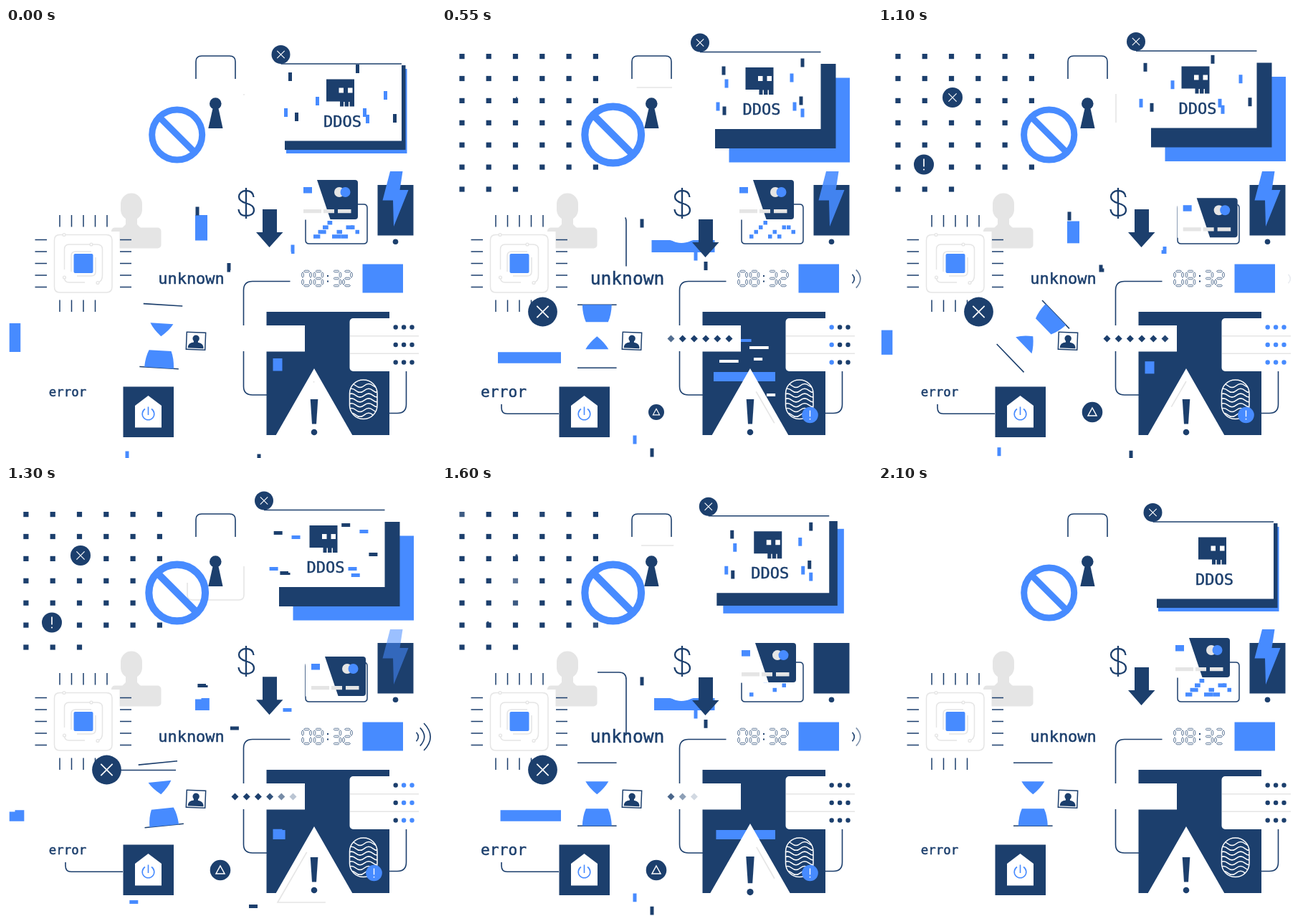
Animation, 600 px wide and 600 px high, one loop 2.15 s. Source, as an HTML page with a canvas:

```html
<!DOCTYPE html>
<html lang="en">
<head>
<meta charset="utf-8">
<title>Cyber security</title>
<style>
html, body { margin: 0; height: 100%; overflow: hidden; background: #fff; }
canvas { display: block; width: 100vw; height: 100vh; }
</style>
</head>
<body>
<canvas id="stage"></canvas>
<script>
const LOOP = 2150, CYCLE = 1040, STEP = 50;
const NAVY = '#1c3f6d', BLUE = '#478bff', GREY = '#e5e5e5', WHITE = '#fff';
const canvas = document.getElementById('stage');
const g = canvas.getContext('2d');
const dpr = window.devicePixelRatio || 1;
canvas.width = canvas.height = 600 * dpr;

// ---- timing ----
const clamp = v => Math.max(0, Math.min(1, v));
const seg = (t, a, b) => clamp((t - a) / (b - a));
const mix = (a, b, p) => a + (b - a) * p;
const sine = p => (1 - Math.cos(Math.PI * p)) / 2;
const quad = p => p < .5 ? 2 * p * p : 1 - 2 * (1 - p) ** 2;
const cubic = p => p < .5 ? 4 * p ** 3 : 1 - 4 * (1 - p) ** 3;
const inOut = (t, a, b, c, d) => sine(seg(t, a, b)) - sine(seg(t, c, d));
const random = n => {
  const v = Math.sin(n * 12.9898 + 4.1) * 43758.5453;
  return v - Math.floor(v);
};
function keys(t, ...list) {
  let [t0, v0] = list[0];
  for (const [t1, v1] of list) {
    if (t < t1) return t <= t0 ? v0 : mix(v0, v1, (t - t0) / (t1 - t0));
    t0 = t1; v0 = v1;
  }
  return v0;
}

// ---- drawing ----
function rect(x, y, w, h, color) {
  g.fillStyle = color;
  g.fillRect(x, y, w, h);
}
function disc(x, y, r, color) {
  g.fillStyle = color;
  g.beginPath();
  g.arc(x, y, Math.max(0, r), 0, 7);
  g.fill();
}
function fill(d, color) {
  g.fillStyle = color;
  g.fill(new Path2D(d));
}
function round(x, y, w, h, r, color) {
  g.fillStyle = color;
  g.beginPath();
  g.roundRect(x, y, w, h, r);
  g.fill();
}
function stroke(d, color = NAVY, width = 1.6) {
  g.strokeStyle = color;
  g.lineWidth = width;
  g.stroke(new Path2D(d));
}
// the stretch of a path from tail to head, both in pixels
function trim(d, tail, head, color, width) {
  if (head <= tail) return;
  g.save();
  g.setLineDash([head - tail, 9999]);
  g.lineDashOffset = -tail;
  stroke(d, color, width);
  g.restore();
}
function at(x, y, scale, draw, angle = 0) {
  if (scale <= .01) return;
  g.save();
  g.translate(x, y);
  g.rotate(angle);
  g.scale(scale, scale);
  draw();
  g.restore();
}
function fade(alpha, draw) {
  if (alpha <= 0) return;
  g.save();
  g.globalAlpha = Math.min(1, alpha);
  draw();
  g.restore();
}
function label(text, x, y, size) {
  g.fillStyle = g.strokeStyle = NAVY;
  g.lineWidth = .5;
  g.font = size + 'px "DejaVu Sans Mono", monospace';
  g.textAlign = 'center';
  g.fillText(text, x, y);
  g.strokeText(text, x, y);
}
function crossBadge(x, y, r) {
  at(x, y, r / 20, () => {
    disc(0, 0, 20, NAVY);
    stroke('M-8-8L8 8M8-8L-8 8', WHITE, 1.7);
  });
}
function alertBadge(x, y, r, color) {
  at(x, y, r / 14, () => {
    disc(0, 0, 14, color);
    stroke('M0-8V3', WHITE, 1.7);
    disc(0, 7, 1.1, WHITE);
  });
}

// ---- glitches ----
// a short bit that drops to (x, y), runs sideways and turns back
function dart(ph, color, x, y, run, drop = 20 * Math.sign(run)) {
  const fall = Math.abs(drop), turn = fall + Math.abs(run), end = turn + 12;
  const tail = keys(ph, [0, 0], [250, fall], [550, turn], [850, end - 5], [930, end]);
  trim(`M${x} ${y - drop}V${y}h${run}v${-12 * Math.sign(run)}`, tail, Math.min(end, tail + 12), color, 5);
}
// a wide bar that falls, squeezes round the corner and stretches out
function slab(ph, x, y, drop, run, width) {
  const end = drop + run;
  const tail = keys(ph, [0, 0], [250, drop - 8], [550, drop + Math.max(0, run - 88)], [800, end]);
  const head = keys(ph, [0, drop - 8], [250, drop + 8], [550, end]);
  trim(`M${x} ${y - drop}V${y}h${run}`, tail, head, BLUE, width);
}
function looseGlitches(ph) {
  slab(ph, 12.5, 460, 48, 153.5, 15.5);
  slab(ph, 272.5, 304.5, 43.5, 108, 17);
  fill('M312 295C324 296 324 300 334 300S346 296 356 295Z', WHITE);
  dart(ph, NAVY, 267, 278.5, 12, 29);
  dart(ph, BLUE, 400, 312.5, -46, 10);
  dart(ph, NAVY, 311, 338, 57, 10);
  dart(ph, NAVY, 353, 586.5, -60);
  dart(ph, BLUE, 169, 580.5, 100, -22);
}

// ---- scene parts ----
function dotGrid(t) {
  for (let j = 0; j < 7; j++) for (let i = 0; i < (j < 6 ? 6 : 3); i++) {
    const x = 27.9 + i * 37.3, y = 39.6 + j * 30.9, n = i + j * 6;
    if (Math.hypot(x - 239, y - 149) < 40) continue;
    const come = seg(t, 10 + j * 14 + random(n) * 120, 220 + j * 14 + random(n) * 120);
    const late = 1540 + random(n + 50) * 350;
    fade(come - seg(t, late, late + 200), () => rect(x - 3.6, y - 3.6, 7.2, 7.2, NAVY));
  }
  crossBadge(104, 97, 14 * inOut(t, 510, 750, 1430, 1650));
  alertBadge(64, 190.5, 14 * inOut(t, 570, 920, 1430, 1650), NAVY);
}

function lock(ph, a, b) {
  stroke('M265 71V47Q265 39 273 39H312Q320 39 320 47V71');
  trim('M332 92V152Q332 159 325 159H260Q253 159 253 152V90Q253 83 260 83H325Q332 83 332 90V92', 298 * a, 298 * b, GREY);
  disc(292.3, 105.5, 8.3, NAVY);
  fill('M289 110H296L302.5 140H282.3Z', NAVY);
  at(238.7, 149, 1 + .125 * inOut(ph, 40, 240, 620, 800), () => {
    stroke('M35 0A35 35 0 1 1 -35 0A35 35 0 1 1 35 0M-25 -25L25 25', BLUE, 9);
  });
}

function panel(t, ph) {
  const u = inOut(t, 0, 500, 1350, 1850);
  const gap = inOut(t, 165, 550, 1380, 1770);
  const bob = -2 * Math.sin(Math.PI * seg(t, 550, 1300));
  const x = 383.5 - 23.5 * u, y = 50 - 16.5 * u + bob;
  const nx = 389 - 8 * Math.sin(u * Math.PI / 2);
  const ny = 52 - 2 * u - 2 * Math.sin(u * Math.PI) + bob;
  rect(nx + 2 + 17.5 * gap, ny + 5 + 14.5 * gap, 168.5, 118, BLUE);
  rect(nx, ny, 168.5, 118, NAVY);
  rect(x, y, 168.5, 107.5, WHITE);
  at(x, y, 1, () => {
    stroke('M0 0H168.5');
    crossBadge(0, -13, 13);
    fill('M63.5 21.5h39v38h-20v-7h-19z', NAVY);
    fill('M81 33.5h6.5v7h-6.5zM93.5 33.5h6.5v7h-6.5zM87.5 53h1.5v7h-1.5zM94.5 53h1.5v7h-1.5z', WHITE);
    label('DDOS', 86, 87.5, 22);
    dart(ph, NAVY, 13, 32, 20);
    dart(ph, NAVY, 22, 88, 12);
    dart(ph, NAVY, 107, 21, 36);
    dart(ph, NAVY, 159, 62, -18);
    dart(ph, BLUE, 7, 82, 18);
    dart(ph, BLUE, 51, 38, -14);
    dart(ph, BLUE, 146, 30, -18);
    dart(ph, BLUE, 117, 82, 15);
    dart(ph, BLUE, 121, 91, 22);
  });
}

function card(t) {
  const s = inOut(t, 700, 1150, 1340, 1740);
  const wide = 1 - inOut(t, 250, 550, 1650, 2000);
  stroke('M423 246H499Q504 246 504 251V296Q504 301 499 301H423Q418 301 418 296V251Q418 246 423 246Z', NAVY, 1.5);
  for (let i = 0; i < 10; i++) {
    if (random(i + 9) < s * 1.4) continue;
    const y = 269 + Math.floor(random(i + 3) * 4) * 6.4;
    rect(429 + i * 6.5, y, 5.5 + 9 * wide * random(i + 30) * (i < 8), 5.5, BLUE);
  }
  at(11 * s, 26 * s, 1, () => {
    rect(407, 211, 84, 56.5, WHITE);
    fill('M434 212H487Q491 212 491 216V263Q491 267 487 267H452.5Z', NAVY);
    rect(415, 222, 12, 8.5, BLUE);
    fill('M415 253h25v5.3h-25zM443 253h15v5.3h-15zM463 253h18.5v5.3h-18.5z', GREY);
    disc(465, 229, 7, GREY);
    disc(473.5, 229, 7, BLUE);
  });
}

function phone(t) {
  rect(518.5, 219, 50, 70.5, NAVY);
  disc(543.5, 298.3, 3.8, NAVY);
  const glow = 1 - inOut(t, 30, 200, 400, 590) - inOut(t, 1210, 1400, 1850, 2050);
  fade(glow, () => fill('M536 200H553.5L549.5 226H561.5L541 277L540 240.5H525.5Z', BLUE));
}

function money(ph) {
  stroke('M335 223V266M345.5 236C345 230 341 227 335 227C329 227 325 231 325 235.5C325 241 330 243 335 244.5C341 246 346 248.5 346 254C346 259.5 341 262 335 262C329 262 325 259 324.5 253', NAVY, 2.3);
  at(0, 14 * inOut(ph, 50, 300, 600, 800), 1, () => fill('M358 253H378V285H386.5L367.5 306L349 285H358Z', NAVY));
}

// lit segments: top, upper right, lower right, bottom, lower left, upper left, middle
const SEGMENTS = { 0: '1111110', 8: '1111111', 3: '1111001', 2: '1101101' };

function digit(x, n) {
  const spots = [[0, 0, 1], [11, 0, 0], [11, 10, 0], [0, 20, 1], [0, 10, 0], [0, 0, 0], [0, 10, 1]];
  spots.forEach(([dx, dy, flat], i) => {
    if (SEGMENTS[n][i] === '0') return;
    at(x + dx + 1, 339.5 + dy, 1, () => stroke(
      flat ? 'M1.5 0L3 -1.3H8L9.5 0L8 1.3H3Z' : 'M0 1.3L-1.3 3V7L0 8.7L1.3 7V3Z', NAVY, .7));
  });
}

function clock(ph) {
  digit(413, 0);
  digit(429.5, 8);
  rect(448, 345, 2, 2, NAVY);
  rect(448, 352.5, 2, 2, NAVY);
  digit(454.5, 3);
  digit(470, 2);
  rect(497.5, 329.5, 56.5, 40, BLUE);
  for (let i = 0; i < 3; i++) {
    const x = 575 + 8 * i, h = 6.2 + 6.4 * i, b = 2.5 + 2.7 * i;
    const on = seg(ph, 50 + 45 * i, 150 + 45 * i) - seg(ph, 600 - 75 * i, 680 - 75 * i);
    fade(on, () => stroke(`M${x - b} ${350 - h}Q${x + b * 1.3} 350 ${x - b} ${350 + h}`));
  }
}

function warning(t, a, b) {
  const s = 1 + .135 * (inOut(t, 60, 230, 270, 450) + inOut(t, 1350, 1500, 1530, 1680));
  const apex = 530 - 55 * s, half = (568 - apex) * .573;
  fill(`M430 ${apex}L${430 + half} 568H${430 - half}Z`, WHITE);
  const e = (s - 1) * 60, w = 51 + e;
  trim(`M430 ${493 - e}L${430 - w} ${581 + e}H${430 + w}Z`, 6 * w * a, 6 * w * b, GREY);
  at(430, 530, s, () => {
    fill('M-5.3 -12H5.3L3 22.5H-3Z', NAVY);
    disc(0, 34, 4.3, NAVY);
  });
}

function fingerprint(t) {
  g.save();
  const print = new Path2D();
  print.roundRect(479.5, 491, 38.5, 54.5, 19);
  g.strokeStyle = WHITE;
  g.lineWidth = 1.5;
  g.stroke(print);
  g.clip(print);
  for (let y = 499; y < 545; y += 6.8) stroke(`M476 ${y}q6 -5 12 0t12 0t12 0t12 0`, WHITE, 1.5);
  g.restore();
  alertBadge(513.5, 540, 11.3 * inOut(t, 50, 230, 1700, 1900), BLUE);
}

function device(t, ph, a, b) {
  stroke('M396.5 353.5H344Q331.5 353.5 331.5 366V415M331.5 451V500Q331.5 512 344 512H364');
  stroke('M558.5 478V525Q558.5 537.5 546 537.5H534');
  rect(363.5, 396, 171.5, 172, NAVY);
  rect(340, 415, 77, 36.5, WHITE);
  round(479.5, 405, 97, 74, 5, WHITE);
  stroke('M480 429.7H576M480 454.2H576', GREY, 1.5);
  for (let i = 0; i < 3; i++) for (let j = 0; j < 3; j++) {
    const lit = t >= 550 + i * 100 && t < 1300 + i * 100;
    disc(543.7 + i * 11.4, 417.5 + j * 24.5, 3.2, lit ? BLUE : NAVY);
  }
  for (let j = 0; j < 6; j++) {
    const alpha = seg(t, 88 + 69 * j, 242 + 69 * j) - seg(t, 1090 + 90 * j, 1390 + 90 * j);
    fade(alpha, () => fill(`M${400.5 - j * 16.2} 428.5l5 5l-5 5l-5 -5z`, NAVY));
  }
  slab(ph, 379, 486.5, 25.5, 86, 13);
  const scan = Math.sin(Math.PI * seg(t, 400, 900));
  [[387, 463], [429, 444], [435, 460], [453, 510]].forEach(([x, y], i) =>
    rect(x, y, (i < 2 ? 33 : 15) * scan, 4, WHITE));
  rect(417, 434, 18 * scan, 4, BLUE);
  warning(t, a, b);
  fingerprint(t);
}

function chip(t) {
  round(160, 230.5, 30, 38, 15, GREY);
  round(147, 278.5, 69.5, 29, 5, GREY);
  fill('M167 260H183V274L188 279H162L167 274Z', GREY);
  rect(62, 284, 96.5, 92, WHITE);
  for (let i = 0; i < 5; i++) {
    const p = i * 16.5;
    stroke(`M${75 + p} 261V277.5M40.5 ${295.5 + p}H57M159 ${295.5 + p}H175`, NAVY, 1.5);
    if (i < 4) stroke(`M${75 + p} 379.5V396`, NAVY, 1.5);
  }
  stroke('M79 288.5H75Q67.5 288.5 67.5 296V361Q67.5 369 75 369H140Q148 369 148 361V296Q148 288.5 140 288.5H83', GREY, 1.5);
  stroke('M81.5 337V309Q81.5 302 88 302H117M121 302H127Q134.5 302 134.5 309V345Q134.5 353 129 355M81.5 349Q82 355 88 355H110M91 340V318Q91 312 97 312H119M125 320V340Q125 346 119 346H99', GREY, 1.5);
  for (const [x, y] of [[81, 288.5], [119, 302], [81.5, 348], [128, 355.5]]) {
    disc(x, y, 2.6, GREY);
    disc(x, y, 1.2, WHITE);
  }
  round(94.5, 315, 27, 27, 2, BLUE);

  const y = t < 700 ? 401 : 396.5;
  const reach = inOut(t, 130, 290, 370, 480) + inOut(t, 1130, 1280, 1370, 1480);
  if (reach > 0) stroke(`M158 ${y}H${158 + 79 * reach}`);
  if (t > 750 && t < 950) stroke('M241 400.5Q246 400.5 250 397.5');
  crossBadge(140.5, 396, 20.4 * inOut(t, 50, 285, 1700, 1900));
}

function hourglass(t) {
  const turn = cubic(seg(t, -85, 415)) + cubic(seg(t, 900, 1400));
  at(216.3, 430.2, 1, () => {
    stroke('M-27.3 -44H27.3M-27.3 44H27.3');
    fill('M-16 -18H16Q11 -9 0 0Q-11 -9 -16 -18ZM-15.5 20H15.5Q20 30 20.5 44H-20.5Q-20 30 -15.5 20Z', BLUE);
  }, turn * Math.PI);
}

function icons(t) {
  at(265, 436.7, 1, () => {
    stroke('M-13.2 -12H13.2V12H-13.2Z', NAVY, 1.5);
    disc(0, -3.5, 4.7, NAVY);
    fill('M-11 10Q-11 3 -3 2V-1H3V2Q11 3 11 10Z', NAVY);
  }, .04);

  const come = sine(seg(t, 50, 490)), gone = sine(seg(t, 1650, 1850));
  trim('M163 538.3H91Q83 538.3 83 530V525', 91 * gone, 91 * come, NAVY);
  rect(163.5, 500.5, 70.5, 70.5, NAVY);
  fill('M180 527L198.5 513L217 527V557.5H180Z', WHITE);
  stroke('M194 531.5A8.3 8.3 0 1 0 203 531.5M198.5 528.5V540', BLUE);

  at(299, 536, inOut(t, 380, 630, 1700, 1900), () => {
    disc(0, 0, 14.3, NAVY);
    stroke('M0 -6L6 5H-6Z', WHITE, 1.5);
  });
}

function words(t, ph) {
  const err = inOut(t, 150, 240, 600, 720) + inOut(t, 1400, 1500, 1660, 1760);
  const big = inOut(ph, 400, 500, 620, 720);
  label('error', 86, 514 + err, 17.4 + 3.8 * err);
  label('unknown', 258.5, 357 + big, 22 + 2.6 * big);
  const wire = 'M217 260H247Q257 260 257 270V348';
  trim(wire, 125 * seg(t, 450, 760), 125 * .87 * seg(t, 350, 550), NAVY);
  trim(wire, 125 * seg(t, 1650, 1800), 125 * seg(t, 1400, 1600), NAVY);
}

function draw(t) {
  // the two glitch cycles end just before the loop does
  const ph = t < 2 * CYCLE ? t % CYCLE : CYCLE;
  const a = quad(seg(ph, 150, 750));
  const b = ph >= 860 ? 0 : Math.max(.006, Math.sin(seg(ph, 0, 700) * Math.PI / 2));
  g.setTransform(dpr, 0, 0, dpr, 0, 0);
  rect(0, 0, 600, 600, WHITE);
  dotGrid(t);
  lock(ph, a, b);
  panel(t, ph);
  chip(t);
  looseGlitches(ph);
  card(t);
  phone(t);
  money(ph);
  clock(ph);
  device(t, ph, a, b);
  hourglass(t);
  icons(t);
  words(t, ph);
}

function tick() {
  const t = performance.now() % LOOP;
  draw(Math.floor(t / STEP) * STEP);
  requestAnimationFrame(tick);
}
tick();
</script>
</body>
</html>
```
